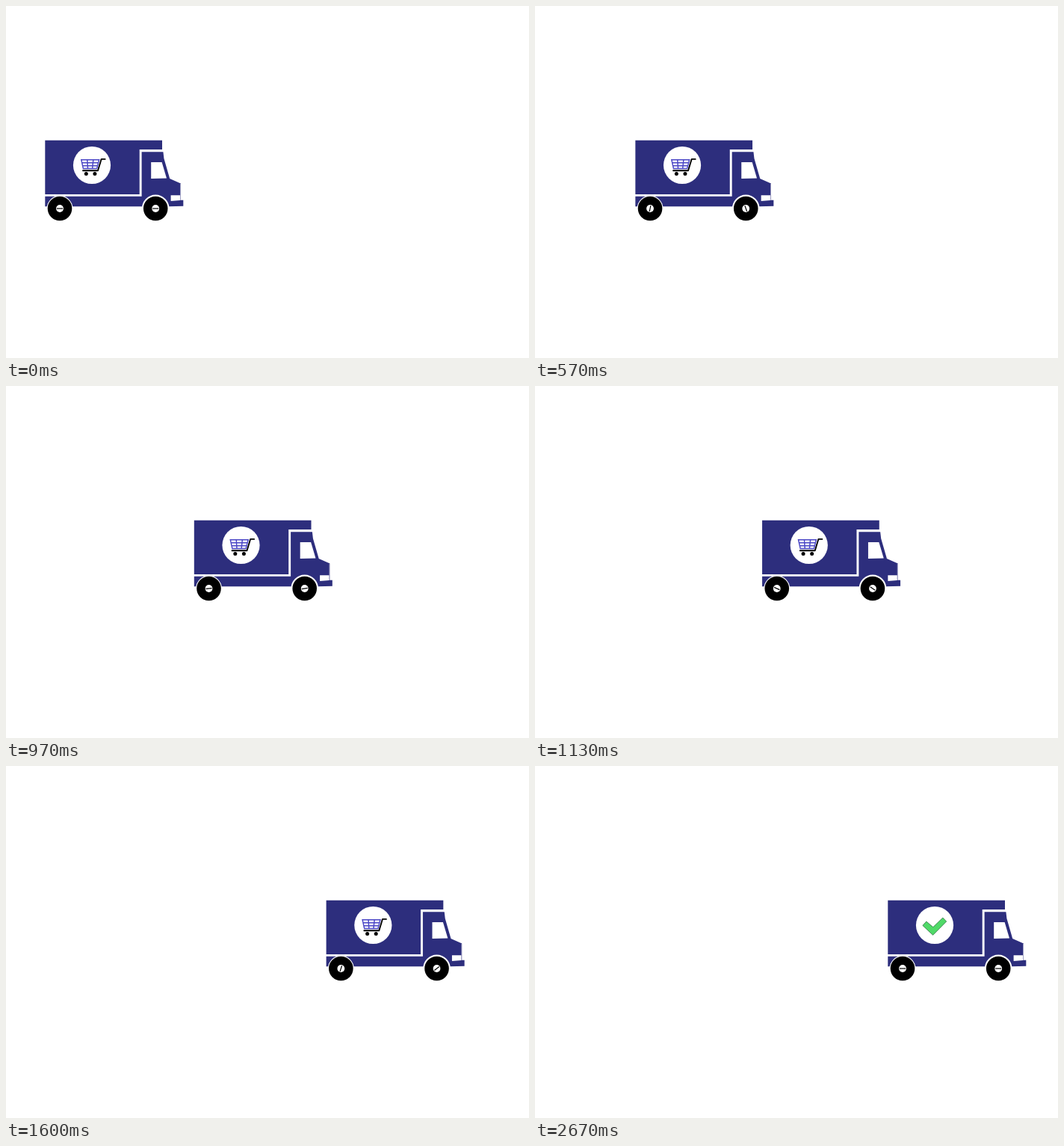
Recreate the animation shown at these times as an HTML page. Size 700 by 471 pixels, loop 3160 ms.

```html
<!DOCTYPE html>
<html lang="en">
<head>
<meta charset="utf-8">
<title>Delivery truck</title>
<style>
  html, body { margin: 0; width: 100%; height: 100%; overflow: hidden; background: #fff; }
  svg { display: block; width: 700px; height: 471px; }
  .body { fill: #2d2e7d; }
  .glass { fill: #fff; }
  .hub { fill: #fff; }
  .spoke { stroke: #000; stroke-width: 1.2; }
</style>
</head>
<body>
<svg viewBox="0 0 700 471">
  <g id="truck">
    <path class="body" d="M52.3 179.8H209V192H178.7V252H52.3Z"/>
    <path class="body" d="M52.3 254.8H181.6V195.2H210.4L211.4 204L219.2 231L233.9 237.4V259.8H237.3V267.8L217 268.2H52.3Z"/>
    <path class="glass" d="M194.2 209H208.6L215 230.4L194.2 231Z"/>
    <path class="glass" d="M220.6 253.2H233V260L220.6 261Z"/>
    <path d="M233.5 238V260" stroke="#fff" stroke-width=".5"/>

    <circle class="glass" cx="72" cy="271" r="17.4"/>
    <circle class="glass" cx="200.2" cy="271" r="18.4"/>
    <g transform="translate(72 271)">
      <circle r="16.3"/>
      <circle class="hub" r="4.9"/>
      <path id="rear" class="spoke" d="M-4 0H4"/>
    </g>
    <g transform="translate(200.2 271)">
      <circle r="16.3"/>
      <circle class="hub" r="4.9"/>
      <path id="front" class="spoke" d="M-4 0H4"/>
    </g>

    <circle class="glass" cx="115" cy="213" r="25.1"/>
    <g id="cart" fill="none">
      <g stroke="#4b47c6" stroke-width="1.5">
        <path d="M100.8 205.8H124.6L121.6 217.6H103.4Z"/>
        <path d="M101.8 209.8H123.6M102.6 213.7H122.6M108.7 205.8L109.5 217.6M116.8 205.8L115.6 217.6"/>
      </g>
      <path d="M132.6 204.9H127.6L123 220.2H103" stroke="#000" stroke-width="1.9" stroke-linecap="round" stroke-linejoin="round"/>
      <g fill="#000">
        <circle cx="107.3" cy="224.5" r="2.5"/>
        <circle cx="118.9" cy="224.5" r="2.5"/>
      </g>
    </g>
  </g>
  <path id="check" d="M518.9 213.4L523.8 208L532.8 215.6L545.8 203L550.7 208L532.6 226.3Z"
        fill="#50d968" stroke="#28663a" stroke-width=".7"/>
</svg>
<script>
  const LOOP = 3160, FPS = 30, LAST = 80;
  const TRAVEL = 420;
  const PIVOT = [560.5, 235.5];

  const el = id => document.getElementById(id);
  const [truck, rear, front, cart, check] =
    ['truck', 'rear', 'front', 'cart', 'check'].map(el);

  const part = (n, from, to) => Math.min(1, Math.max(0, (n - from) / (to - from)));
  const ease = u => u * u * (3 - 2 * u);

  function draw(ms) {
    const n = Math.min(LAST, Math.floor((ms + 5) * FPS / 1000));
    const roll = part(n, 0, 60);
    const drive = ease(roll);
    const pop = ease(part(n, 60, 80));
    const [px, py] = PIVOT;

    truck.setAttribute('transform', `translate(${TRAVEL * drive} 0)`);
    rear.setAttribute('transform', `rotate(${360 * roll})`);
    front.setAttribute('transform', `rotate(${360 * drive})`);
    cart.setAttribute('opacity', 1 - ease(part(n, 50, 70)));
    check.setAttribute('visibility', pop ? 'visible' : 'hidden');
    check.setAttribute('transform',
      `translate(${px} ${py}) scale(${pop}) translate(${-px} ${-py})`);
  }

  const start = performance.now();
  function tick() {
    draw((performance.now() - start) % LOOP);
    requestAnimationFrame(tick);
  }
  tick();
</script>
</body>
</html>
```
